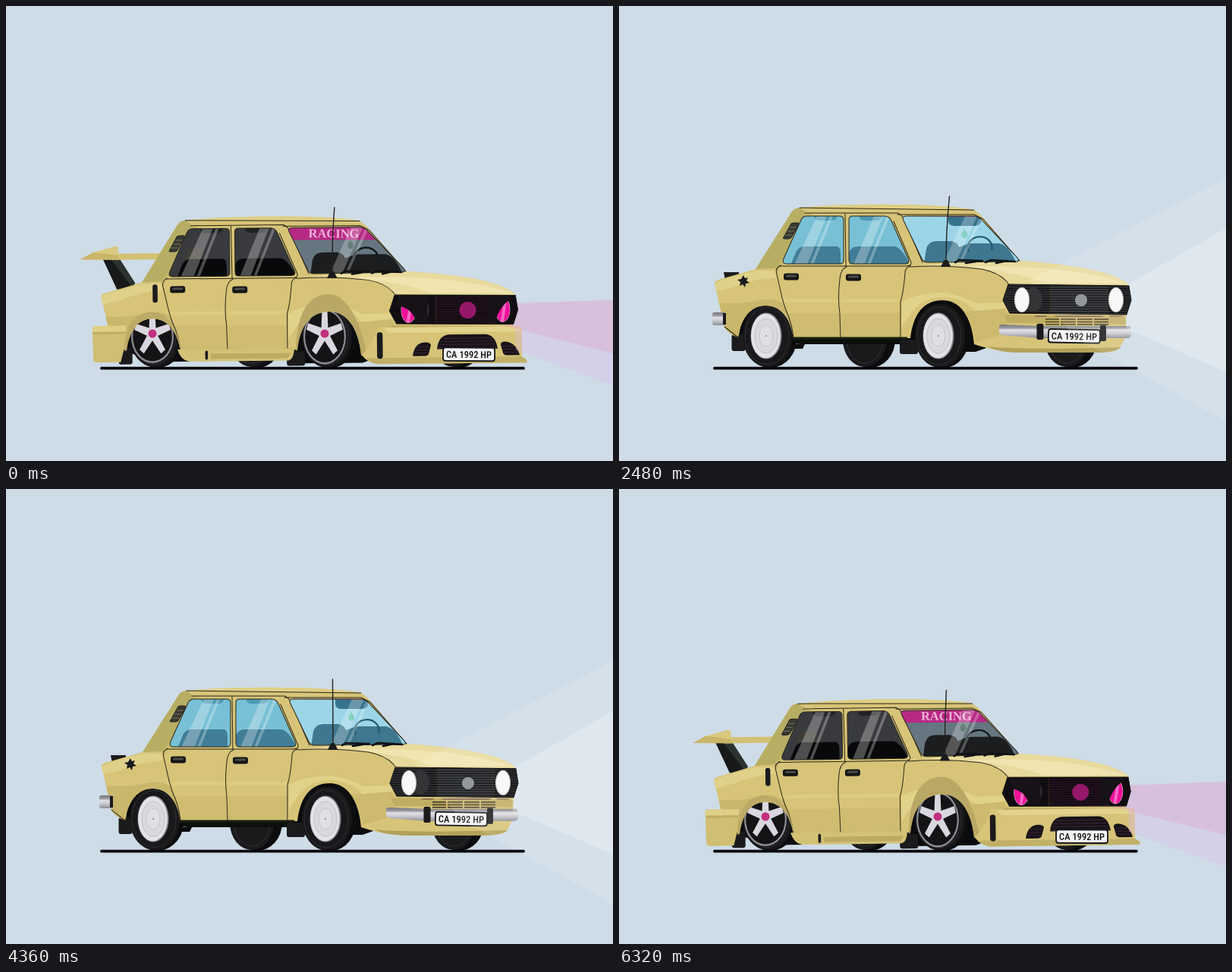
An HTML page that plays this animation: 800x600 px, repeating every 6.36 s.

```html
<!DOCTYPE html>
<html lang="en">
<head>
<meta charset="utf-8">
<title>Saloon tuning loop</title>
<style>
  html, body { margin: 0; width: 100%; height: 100%; overflow: hidden; background: #cedce7; }
  svg { display: block; width: 800px; height: 600px; }
  .line { fill: none; stroke: #2b2719; stroke-width: 1; stroke-linecap: round; stroke-linejoin: round; }
  .dark { fill: #1b1b1d; }
  .plate { font: 500 12.5px "Roboto Condensed", "Open Sans Condensed", Roboto, sans-serif; font-stretch: condensed; }
  .racing { font: 700 16.5px "Liberation Serif", "Noto Serif", serif; }
</style>
</head>
<body>
<svg viewBox="0 0 800 600">
  <defs>
    <linearGradient id="chrome" x1="0" y1="0" x2="0" y2="1">
      <stop offset="0" stop-color="#77777d"/><stop offset=".25" stop-color="#98989e"/>
      <stop offset=".4" stop-color="#e2e1e8"/><stop offset=".65" stop-color="#c9c8d0"/>
      <stop offset="1" stop-color="#8c8c93"/>
    </linearGradient>
    <pattern id="slats" width="8" height="3.2" patternUnits="userSpaceOnUse">
      <path d="M0,1H8" stroke="#09090b" stroke-width="1.1"/>
    </pattern>
    <path id="rearGlass" d="M221,340Q214,340 217,333L240,282Q242,277 248,277H291Q296,277 296,282V335Q296,340 291,340Z"/>
    <path id="frontGlass" d="M308,340Q303,340 303,335V282Q303,277 308,277H350Q356,277 359,283L381,333Q384,340 377,340Z"/>
    <path id="shield" d="M379,277H467Q473,277 477,281L525,332Q529,337 523,337L407,338Q401,338 399,333L375,283Q372,277 379,277Z"/>
    <clipPath id="sideClip"><use href="#rearGlass"/><use href="#frontGlass"/></clipPath>
    <clipPath id="shieldClip"><use href="#shield"/></clipPath>
    <clipPath id="gapClip"><path d="M513,367L672,369L675,388L669,407L515,405L506,388Z"/></clipPath>
  </defs>

  <g id="farWheels"></g>

  <g class="car">
    <path fill="#0b0b0d" d="M158,437C160,405 176,393 194,394C214,394 230,415 232,446H245L242,452H205L162,440Z"/>
    <path fill="#0b0b0d" d="M383,440C386,405 402,386 427,386C450,386 470,412 484,451L470,456H385Z"/>
    <path fill="#0d0f0c" d="M226,437H384V444Q380,446 372,446H240Q230,446 226,440Z"/>
    <rect class="dark" x="148.500" y="433" width="18" height="22" rx="3"/>
    <rect class="dark" x="370" y="440" width="24" height="19" rx="3"/>
  </g>

  <g id="nearWheels"></g>

  <g class="car">
    <path class="dark rearStock" d="M138,351L158,351L158,362L140,362Z"/>
    <g id="spoiler">
      <path id="strut" fill="#17191a"/>
      <path id="strutSide" fill="#2c3330"/>
      <g id="wing">
        <path fill="#d3c173" d="M140,309H240V317H140Z"/>
        <path fill="#dac97f" d="M99,316L116,307L146,299Q149,299 149,302L150,317Z"/>
        <path fill="#c9b669" d="M99,316L116,307L149,311L150,317Z"/>
      </g>
    </g>

    <path fill="#d7c478" d="M126,365Q127,362 131,361L180,347L228,271Q232,266 239,266Q290,261 370,262Q440,263 468,269L476,275L528,336Q600,341 640,352Q665,360 672,368L675,388L669,408L668,436L660,451Q656,456 635,457H530Q500,457 468,446C465,408 448,388 427,388C402,388 388,405 384,438H230C226,410 212,395 193,395C175,395 161,410 157,437Q143,432 139,423Z"/>
    <path fill="#b7ae64" d="M180,347L228,271Q232,266 239,266L247,273L213,338L206,346Z"/>
    <path fill="#c8b76a" d="M206,346L213,338L247,273H255L217,338L208,352Z"/>
    <path fill="#dfcf84" d="M238,266Q290,261 370,262Q440,263 468,269Z"/>
    <path fill="#c9b76b" d="M139,392H157Q174,391 190,387Q215,384 222,402L230,438C226,410 212,395 193,395C175,395 161,410 157,437Q143,432 139,423L132,392Z"/>
    <path fill="#e0d18a" d="M134,362L180,349H205L207,358Q176,360 150,371L128,376L126,366Z"/>
    <path fill="#cfbc70" d="M223,405H291L292,438H230ZM293,405H371V438H293Z"/>
    <path fill="#dccb80" d="M212,386H291V391H214ZM293,386H372L371,391H293Z"/>
    <path fill="#e1d28a" d="M373,390Q395,378 430,378Q455,383 471,392L510,391L508,402H470Q452,384 427,384Q398,383 381,411L372,424Z"/>
    <path fill="#cdba6e" d="M471,402L508,399L514,409L512,424L500,435L470,443Q466,418 455,402Z"/>
    <path fill="#e8da9d" d="M384,344L438,338L528,336Q600,341 640,352Q665,360 672,368L513,366Q503,352 478,347Q430,341 384,344Z"/>
    <path fill="#f0e5b0" d="M456,344Q520,341 585,348Q640,356 668,366L560,365Q525,350 456,344Z"/>
    <path fill="#c0ad64" d="M507,407L669,410L668,420L512,418Z"/>
    <path fill="#b2a15a" d="M486,449Q530,454 661,450Q656,456 635,457H530Q500,457 486,449Z"/>
    <path class="line" d="M238,266L468,269M245,273H367Q371,274 375,280L400,338M367,275H468L480,281L528,336M213,342L210,344Q206,347 208,354L215,385Q219,400 223,408Q229,425 230,438M298,274L299,343M212,343H378Q386,343 385,338L362,284M300,344Q292,347 291,360Q288,386 291,405L292,438M384,343Q377,345 377,352Q375,378 371,390V438M384,344Q430,341 478,347Q503,352 513,366M139,423L157,437"/>
    <path d="M230,438H380" stroke="#18200f" stroke-width="3"/>
    <path fill="#393932" stroke="#20201d" d="M217,305L227,287Q228,286 231,286H235Q238,286 236,290L227,305Q226,307 223,307H219Q215,307 217,305Z"/>
    <path stroke="#7a7660" d="M225,292H234M222,297H231M219,302H228"/>
    <g id="handles"></g>

    <g id="cap"><path class="dark" d="M164,355L166,359L170,358L168,362L172,365L167,366L166,371L163,367L159,369L160,364L156,361L161,360Z"/></g>
    <rect id="vent" class="dark" x="194" y="350" width="6.500" height="24" rx="3.200"/>

    <g clip-path="url(#sideClip)">
      <path fill="#78c0d5" d="M200,270H390V345H200Z"/>
      <path fill="#417d97" d="M226,342L233,325Q236,317 246,317H286Q292,317 292,326V342ZM303,342V326Q305,317 316,317H362Q372,317 384,342Z"/>
      <path fill="#4d9ab4" d="M257,276H288Q287,283 279,283H264Q258,283 257,276ZM316,276H347Q346,283 338,283H323Q317,283 316,276Z"/>
      <g class="tint">
        <path fill="#383a3d" d="M200,270H390V345H200Z"/>
        <path fill="#08090a" d="M226,342L233,325Q236,317 246,317H286Q292,317 292,326V342ZM303,342V326Q305,317 316,317H362Q372,317 384,342Z"/>
        <path fill="#46402f" d="M243,303L262,302V317H236Z" opacity=".6"/>
        <path fill="#202123" d="M257,276H288Q287,283 279,283H264Q258,283 257,276ZM316,276H347Q346,283 338,283H323Q317,283 316,276Z"/>
      </g>
      <path fill="#fff" opacity=".28" d="M261,277H274L248,341H231ZM278,277H282L256,341H252ZM336,277H348L323,341H309ZM353,277H357L331,341H327Z"/>
    </g>

    <g clip-path="url(#shieldClip)">
      <path fill="#9bd5e7" d="M365,270H535V345H365Z"/>
      <path fill="#3e778f" d="M402,340L405,320Q408,310 418,310H437Q446,311 448,318L462,313H501Q514,315 524,340Z"/>
      <path fill="#36738d" d="M434,277H477V284Q476,290 469,290H441Q434,289 434,283Z"/>
      <g class="tint">
        <path fill="#667680" d="M365,270H535V345H365Z"/>
        <path fill="#1c1d1f" d="M402,340L405,320Q408,310 418,310H437Q446,311 448,318L462,313H501Q514,315 524,340Z"/>
      </g>
      <path d="M461,324A16,14 0 1 1 491,322" fill="none" stroke="#25586b" stroke-width="2.200"/>
      <path d="M461,324A16,14 0 1 1 491,322" fill="none" stroke="#141517" stroke-width="2.200" class="tint"/>
      <path fill="#5fc0ad" d="M455,292L456,296Q461,299 459,304Q456,308 452,304Q450,299 454,296Z"/>
      <path fill="#35544d" class="tuned" d="M455,292L456,296Q461,299 459,304Q456,308 452,304Q450,299 454,296Z"/>
      <g id="strip">
        <path fill="#b72984" d="M365,275H495V294L365,293Z"/>
        <text class="racing" fill="#f2b3d8" x="400" y="290" transform="rotate(1 402 290)">RACING</text>
      </g>
      <path fill="#fff" opacity=".25" d="M457,275H473L443,340H427ZM477,275H481L451,340H447Z"/>
    </g>
    <g class="line"><use href="#rearGlass"/><use href="#frontGlass"/><use href="#shield"/></g>
    <path d="M443,338L448,335L479,336M457,339L470,337M483,338L490,335L522,337M497,339L511,336" fill="none" stroke="#111113" stroke-width="2.600" stroke-linecap="round"/>

    <g id="chromeBar">
      <path stroke="#4e452a" stroke-width="1.700" d="M562,413H645M562,416.500H645M562,420H645"/>
      <path stroke="#cdba6e" stroke-width="2" d="M581,411V421M603,411V421M625,411V421"/>
      <path fill="url(#chrome)" d="M504,420L556,422H672Q675,423 675,427V434Q674,438 670,438H556L505,434Q501,433 501,428V423Q501,420 504,420Z"/>
      <rect class="dark" x="550.500" y="419" width="9" height="21" rx="2"/>
      <rect class="dark" x="634" y="421" width="8" height="21" rx="2"/>
    </g>
    <g class="rearStock">
      <path fill="url(#chrome)" d="M126,404H138Q141,404 141,408V418Q141,421 137,421H126Q123,421 123,418V407Q123,404 126,404Z"/>
      <path class="dark" d="M137,405H141V420H137Z"/>
    </g>

    <g class="tuned">
      <path fill="#b9a865" d="M382,440C383,382 404,365 426,365C450,366 467,398 476,447L468,446C465,408 448,388 427,388C402,388 388,405 384,438Z"/>
      <path fill="#bcab67" d="M156,437C158,398 174,386 194,386C215,387 226,412 232,438H230C226,410 212,395 193,395C175,395 163,410 159,437Z"/>
    </g>
    <g id="rearSkirt">
      <path fill="#d0be72" d="M114,408Q114,404 118,404H159Q157,423 155,437L151,452H120Q115,452 115,448Z"/>
      <path fill="#dfcf86" d="M114,408Q114,404 118,404H159L158,412H114Z"/>
      <path fill="#bfad65" d="M115,412H158L157,415H115Z"/>
    </g>
    <g id="sill">
      <path fill="#d3c175" d="M226,436H380Q379,451 372,452H241Q230,450 226,436Z"/>
      <path fill="#bdab63" d="M270,442H375Q373,449 368,449H270Z"/>
      <rect class="dark" x="262.500" y="438" width="3.500" height="12" rx="1.700"/>
    </g>
    <g id="noseSkirt">
      <path fill="#d7c478" d="M469,446Q484,430 491,409L504,410H677Q680,411 680,415V452L686,454V458H490Q477,457 469,446Z"/>
      <path fill="#e3d48d" d="M498,410H677Q680,411 680,415V417H505Z"/>
      <path fill="#c2b068" d="M474,450H680L686,454V458H490Q480,457 474,450Z"/>
      <rect class="dark" x="489" y="416" width="7.500" height="35" rx="3.500"/>
      <g fill="#171317">
        <path d="M568,439Q570,421 584,420H632Q645,421 648,439Z"/>
        <path d="M536,448Q538,431 552,430Q560,430 560,434L557,445Q556,448 552,448Z"/>
        <path d="M652,434Q652,430 658,430Q672,431 677,448H660Q656,448 655,445Z"/>
      </g>
      <path fill="none" stroke="#4a2940" stroke-width=".8" d="M576,425H640M573,429H643M571,433H645M569,437H647M541,436H558M539,440H557M538,444H556M654,436H670M655,440H674M656,444H676"/>
    </g>

    <g id="plate">
      <g transform="rotate(1 600 435)">
        <rect x="566" y="426.500" width="68" height="17.500" rx="3" fill="#f4f4f6" stroke="#151517" stroke-width="1.800"/>
        <text class="plate" x="600" y="440" text-anchor="middle" fill="#151517">CA 1992 HP</text>
      </g>
    </g>

    <g id="beams"><polygon id="inner"/><polygon id="outer"/></g>

    <path fill="#1e1e20" stroke="#111" d="M513,367L672,369L675,388L669,407L515,405L506,388Z"/>
    <g clip-path="url(#gapClip)">
      <path fill="#303134" d="M505,366H676V408H505Z"/>
      <path class="tint" fill="#150f14" d="M505,366H676V408H505Z"/>
      <path fill="#434548" d="M568,369L645,370V406H568Z"/>
      <path class="tint" fill="#25101f" d="M568,369L645,370V406H568Z"/>
      <path fill="url(#slats)" d="M505,366H676V408H505Z"/>
      <path class="line" d="M567,367V406M645,369V407"/>
      <ellipse cx="546" cy="387" rx="12" ry="16" fill="#343437"/>
      <g id="lamps"></g>
      <g id="lids" fill="#171217">
        <path d="M516,366H556V404L541,402Q535,384 516,381Z"/>
        <path d="M635,366H666L664,375Q650,385 645,404L635,406Z"/>
      </g>
    </g>
    <circle id="badge" cx="609" cy="388"/>

    <path id="mast" fill="none" stroke="#222" stroke-width="1.400" stroke-linecap="round"/>
    <path class="dark" d="M424,344L428.500,335H433L437.500,344Z"/>
  </g>

  <path d="M126,477.700H682" stroke="#07070c" stroke-width="3.800" stroke-linecap="round"/>
</svg>
<script>
const LOOP = 6360, ROCK = 795;
const $ = id => document.getElementById(id);
const all = sel => [...document.querySelectorAll(sel)];
const mix = (a, b, k) => a + (b - a) * k;
const mixAll = (a, b, k) => a.map((v, i) => mix(v, b[i], k));
const clamp = x => Math.min(1, Math.max(0, x));
const ease = (t, a, b) => (1 - Math.cos(Math.PI * clamp((t - a) / (b - a)))) / 2;
const bump = (t, a, b) => Math.sin(Math.PI * clamp((t - a) / (b - a)));

const ellipse = (x, rx, ry, style) => `<ellipse cx="${x}" rx="${rx}" ry="${ry}" ${style}/>`;

// Five spokes in a unit circle, stretched to the rim's ellipse
const spokes = [0, 72, 144, 216, 288].map(a =>
  `<path transform="rotate(${a})" d="M-.19,0L-.14,-.96H.14L.19,0Z"/>`).join('');

const nearWheel = (x, y, ry, rim) => `
  <g transform="translate(${x} ${y})"><g class="wheel">
    ${ellipse(8, 33, ry, 'fill="#0d0d0f"')}
    ${ellipse(2, 33, ry, 'fill="#19191b"')}
    ${ellipse(1, 29, ry - 4, 'fill="none" stroke="#2f2f32"')}
    ${ellipse(0, 20.5, 30.5, 'fill="#8c8b91"')}
    ${ellipse(-.6, 19.3, 29.3, 'fill="#e4e1e8"')}
    ${ellipse(0, 15, 23, 'fill="#dad7df" stroke="#c2bfc8"')}
    ${ellipse(0, 9, 14, 'fill="#e1dee5" stroke="#c8c5cd"')}
    <g class="alloy"><g transform="translate(-1 1)">
      ${ellipse(0, 28, rim, 'fill="#8d8d92"')}
      ${ellipse(0, 25.8, rim - 2.4, 'fill="#141416"')}
      <g transform="translate(0 -4)">
        <g transform="scale(25 ${rim - 4.5})" fill="#dad6df">${spokes}</g>
        <circle r="5.500" fill="#c2307f"/>
      </g>
    </g></g>
  </g></g>`;

const farWheel = x => `<g transform="translate(${x} 440)">
  ${ellipse(3, 33, 37, 'fill="#0c0c0e"')}${ellipse(-4, 29, 36, 'fill="#1a1a1c"')}
  ${ellipse(-4, 24, 31, 'fill="none" stroke="#323235"')}</g>`;

const handle = (x, y) => `<rect x="${x}" y="${y}" width="20" height="9" rx="3" fill="#151515"/>
  <rect x="${x + 3}" y="${y + 2}" width="14" height="3" rx="1.5" fill="#4b4b49"/>`;

const lamp = x => `<ellipse cx="${x}" cy="387.5" rx="9.5" ry="16" fill="#f8f8f7" stroke="#c9cac9"/>
  <g class="tint"><ellipse cx="${x}" cy="387.5" rx="9.5" ry="16" fill="#f0109b"/></g>
  <path class="tuned" d="M${x - 1},404L${x + 4},374" stroke="#f768c3" stroke-width="4"/>`;

$('farWheels').innerHTML = farWheel(328) + farWheel(594);
$('nearWheels').innerHTML = nearWheel(194, 435, 41.5, 35) + nearWheel(421, 435, 42, 36.5);
$('handles').innerHTML = handle(217, 352.5) + handle(299, 353.5);
$('lamps').innerHTML = lamp(531) + lamp(655);

const [cars, tuned, tinted, rearStock, alloys, wheels] =
  ['.car', '.tuned', '.tint', '.rearStock', '.alloy', '.wheel'].map(all);
const beams = {
  outer: {
    stock: [540, 362, 830, 211, 830, 564, 600, 437], tuned: [565, 384, 830, 375, 830, 455, 640, 405],
    paint: [[255, 255, 255, .12], [222, 155, 188, .3]]
  },
  inner: {
    stock: [665, 370, 830, 276, 830, 495, 668, 425], tuned: [670, 378, 830, 378, 830, 501, 672, 441],
    paint: [[255, 255, 255, .25], [220, 183, 230, .35]]
  }
};

const move = (el, value) => el.setAttribute('transform', value);
const scaleAt = (id, x, y, sx, sy = sx) =>
  move($(id), `translate(${x} ${y}) scale(${sx} ${sy}) translate(${-x} ${-y})`);
const fade = (list, o) => list.forEach(el => el.setAttribute('opacity', o));
const rock = t => .014 * Math.cos(2 * Math.PI * (t / ROCK - .3));
const restAngle = rock(2480);

function draw(t) {
  const early = t < 3000;
  const q = early ? 1 - ease(t, 1320, 1640) : ease(t, 5010, 5240);
  const drop = 16 * (early ? 1 - ease(t, 1320, 1570) : ease(t, 5040, 5285));
  const squash = 1 - .025 * bump(t, 1400, 1640);
  const turn = (rock(t) - restAngle) * 180 / Math.PI;
  const tint = Math.sqrt(q), arc = Math.sin(Math.PI * q), lag = 1 - q;

  cars.forEach(el => move(el,
    `translate(0 ${drop}) rotate(${turn} 317 435) translate(0 437) scale(1 ${squash}) translate(0 -437)`));
  fade(tuned, q);
  fade(tinted, tint);
  fade(rearStock, clamp(1 - 2.5 * q));
  fade([$('chromeBar')], clamp(lag * 1.4));
  fade([$('lids')], clamp(q * 2 - .8));

  const swell = 1 + .1 * arc;
  wheels.forEach(el => move(el, `translate(0 ${42 * (1 - swell)}) scale(${swell})`));
  alloys.forEach(el => move(el, `scale(${.02 + q * .98})`));

  const dx = -17 * lag, dy = -19 * lag;
  scaleAt('spoiler', 165, 350, clamp(q / .25));
  move($('wing'), `translate(${dx} ${dy})`);
  $('strut').setAttribute('d', `M${129 + dx},${316 + dy}H${151 + dx}L171,348L167,356H147Z`);
  $('strutSide').setAttribute('d', `M${139 + dx},${316 + dy}H${151 + dx}L171,348L166,352Z`);

  scaleAt('cap', 164, 363, clamp(1 - 1.5 * q));
  scaleAt('vent', 197, 362, clamp(q * 2), tint);
  scaleAt('rearSkirt', 157, 404, clamp(q * 4), q);
  scaleAt('sill', 300, 436, 1, q);
  scaleAt('noseSkirt', 600, 409, clamp(.85 + q), q);
  move($('strip'), `translate(0 ${-16 * lag})`);
  move($('plate'), `translate(${10 * q} ${11 * q})`);
  $('badge').setAttribute('r', mix(8, 11, q));
  $('badge').setAttribute('fill', `rgb(${mixAll([147, 153, 155], [150, 24, 106], q)})`);

  const sway = 1.5 + 3 * Math.cos(2 * Math.PI * (t / ROCK - .12))
    - 9 * bump(t, 5060, 5400) - 5 * bump(t, 1380, 1660);
  $('mast').setAttribute('d', `M431,338Q431,295 ${431 + sway},251`);

  move($('beams'), `rotate(${-6 * arc} 660 388)`);
  for (const [id, b] of Object.entries(beams)) {
    $(id).setAttribute('points', mixAll(b.stock, b.tuned, q).join(' '));
    $(id).setAttribute('fill', `rgba(${mixAll(...b.paint, tint)})`);
  }
}

const start = performance.now();
function tick() {
  draw((performance.now() - start) % LOOP);
  requestAnimationFrame(tick);
}
tick();
</script>
</body>
</html>
```
